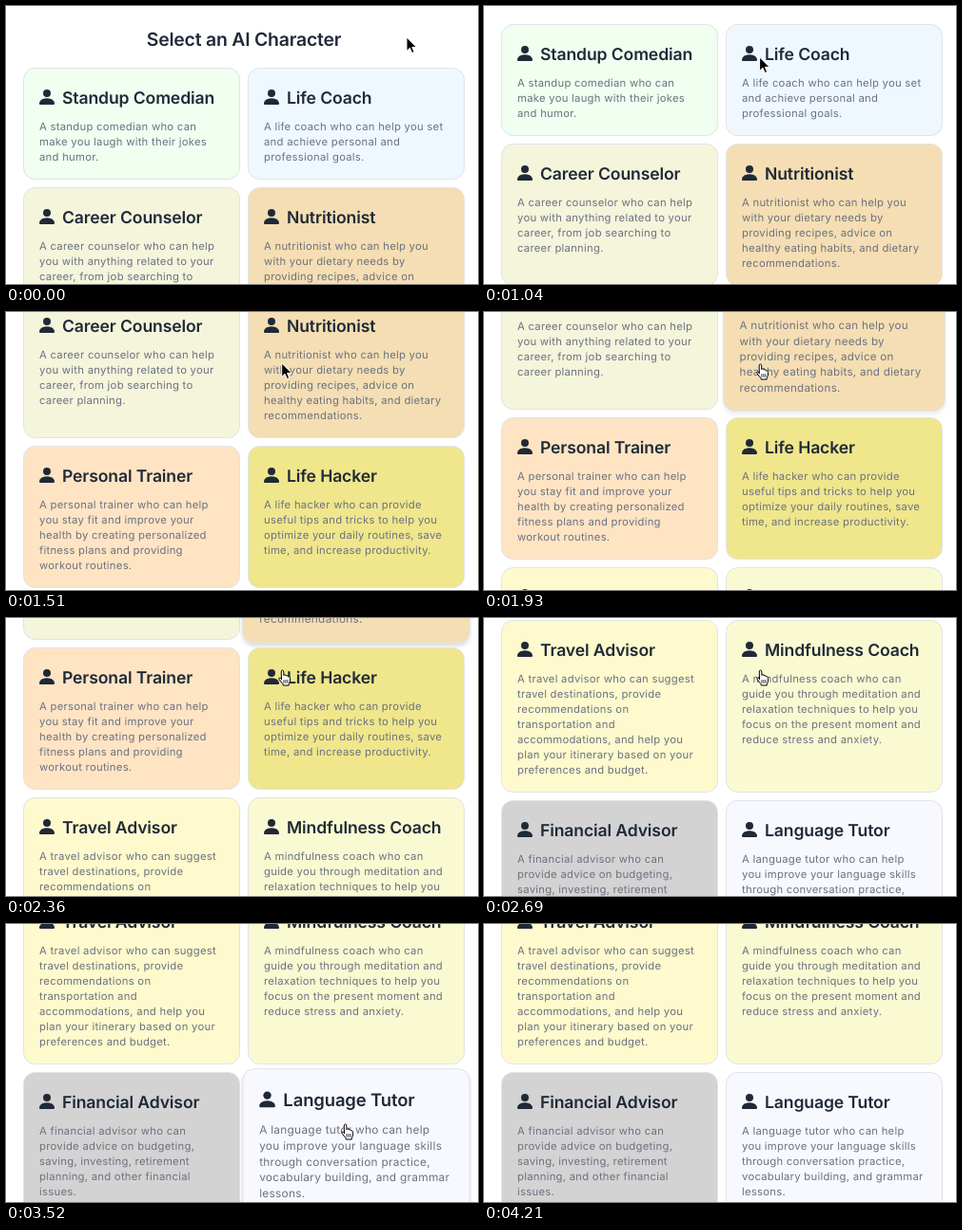
Recreate the animation shown at these times as an HTML page. Size 496 by 293 pixels, loop 4.57 s.

```html
<!DOCTYPE html>
<html lang="en">
<head>
<meta charset="utf-8">
<title>Select an AI Character</title>
<style>
html, body { margin: 0; width: 100%; height: 100%; overflow: hidden; background: #fff; }
svg { display: block; font-family: Inter, "Liberation Sans", sans-serif; text-rendering: geometricPrecision; -webkit-font-smoothing: antialiased; }
.title { font-size: 19.4px; font-weight: 600; letter-spacing: -.2px; fill: #1f2937; text-anchor: middle; }
.name { font-size: 17.6px; font-weight: 600; letter-spacing: -.13px; fill: #1f2937; }
.line { font-size: 11.3px; letter-spacing: .26px; fill: #6b7280; }
.icon { fill: #1f2937; }
</style>
</head>
<body>
<svg id="stage" width="496" height="293" viewBox="0 0 496 293">
  <g id="page"><text class="title" x="250" y="42">Select an AI Character</text></g>
  <path id="arrow" d="M0 0V14.5L3.4 11.3 5.6 16.5 8 15.5 5.8 10.4H10.5Z" fill="#000" stroke="#fff" stroke-linejoin="round"/>
  <g id="hand" stroke="#000" stroke-linecap="round" stroke-linejoin="round">
    <path fill="#fff" d="M-.5 10.5L-.7 3Q-.8 1 .5 1Q1.8 1 1.9 3V6.5Q2.3 5.6 3.3 5.8Q4.2 6 4.3 7Q4.9 6.4 5.7 6.7Q6.5 7 6.5 8Q7.2 7.6 8 8Q8.7 8.4 8.6 9.5V12Q8.4 14 7.3 15.5V17H1.3L1 15.6L-2.8 10.9Q-3.6 9.6-2.6 9Q-1.7 8.6-.5 10.5Z"/>
    <path fill="none" stroke-width=".8" d="M2 11.5V14.3M4 11.5V14.3M6 11.5V14.3"/>
  </g>
</svg>
<script>
(() => {
const LOOP = 4570, FADE = 300, CARD_W = 228, GAP = 8;
const NS = "http://www.w3.org/2000/svg";
const $ = id => document.getElementById(id);

// name, colour, text lines, [enter, leave] of the pointer in ms
const roles = [
  ["Standup Comedian", "#f0fff0", "A standup comedian who can|make you laugh with their jokes|and humor."],
  ["Life Coach", "#f0f8ff", "A life coach who can help you set|and achieve personal and|professional goals."],
  ["Career Counselor", "#f5f5dc", "A career counselor who can help|you with anything related to your|career, from job searching to|career planning."],
  ["Nutritionist", "#f5deb3", "A nutritionist who can help you|with your dietary needs by|providing recipes, advice on|healthy eating habits, and dietary|recommendations.", [1825, 2450]],
  ["Personal Trainer", "#ffe4c4", "A personal trainer who can help|you stay fit and improve your|health by creating personalized|fitness plans and providing|workout routines."],
  ["Life Hacker", "#f0e68c", "A life hacker who can provide|useful tips and tricks to help you|optimize your daily routines, save|time, and increase productivity."],
  ["Travel Advisor", "#fffacd", "A travel advisor who can suggest|travel destinations, provide|recommendations on|transportation and|accommodations, and help you|plan your itinerary based on your|preferences and budget."],
  ["Mindfulness Coach", "#fafad2", "A mindfulness coach who can|guide you through meditation and|relaxation techniques to help you|focus on the present moment and|reduce stress and anxiety.", [2705, 2945]],
  ["Financial Advisor", "#d3d3d3", "A financial advisor who can|provide advice on budgeting,|saving, investing, retirement|planning, and other financial|issues.", [2950, 3150]],
  ["Language Tutor", "#f8f8ff", "A language tutor who can help|you improve your language skills|through conversation practice,|vocabulary building, and grammar|lessons.", [3160, 3895]]
];

function add(parent, tag, attrs, text) {
  const el = document.createElementNS(NS, tag);
  for (const k in attrs) el.setAttribute(k, attrs[k]);
  if (text) el.textContent = text;
  parent.appendChild(el);
  return el;
}

function addCard([name, fill, body, hover], x, y, h) {
  const g = add($("page"), "g", {});
  const rect = add(g, "rect", { x: .5, y: .5, width: CARD_W - 1, height: h - 1, rx: 12, fill, stroke: "#e0e3e8" });
  const icon = add(g, "g", { class: "icon", transform: "translate(14.33 20.33) scale(1.333)" });
  add(icon, "circle", { cx: 8, cy: 5, r: 3 });
  add(icon, "path", { d: "M3 14s-1 0-1-1 1-4 6-4 6 3 6 4-1 1-1 1z" });
  add(g, "text", { class: "name", x: 41, y: 37.5 }, name);
  body.split("|").forEach((s, i) => add(g, "text", { class: "line", x: 17, y: 65.5 + 16 * i }, s));
  return { g, rect, hover, x, y, h };
}

const cards = [];
let rowY = 65;
for (let i = 0; i < roles.length; i += 2) {
  const pair = roles.slice(i, i + 2);
  const h = 70 + 16 * Math.max(...pair.map(r => r[2].split("|").length));
  pair.forEach((r, k) => cards.push(addCard(r, 18 + k * (CARD_W + GAP), rowY, h)));
  rowY += h + GAP;
}

// cubic-bezier(.4, 0, .2, 1)
function ease(x) {
  if (x <= 0) return 0;
  if (x >= 1) return 1;
  let lo = 0, hi = 1, s = .5;
  for (let i = 0; i < 20; i++) {
    s = (lo + hi) / 2;
    const u = 1 - s;
    if (1.2 * s * u * u + .6 * s * s * u + s * s * s < x) lo = s; else hi = s;
  }
  return s * s * (3 - 2 * s);
}

// Smooth curve through points without overshoot
function curve(pts, col) {
  const n = pts.length, T = i => pts[i][0], V = i => pts[i][col];
  const d = i => (V(i + 1) - V(i)) / (T(i + 1) - T(i));
  const m = pts.map((p, i) => {
    if (!i || i === n - 1) return 0;
    const a = d(i - 1), b = d(i);
    return a * b > 0 ? 2 * a * b / (a + b) : 0;
  });
  return t => {
    if (t <= T(0)) return V(0);
    if (t >= T(n - 1)) return V(n - 1);
    let i = 0;
    while (t > T(i + 1)) i++;
    const w = T(i + 1) - T(i), s = (t - T(i)) / w, u = 1 - s;
    return V(i) * (1 + 2 * s) * u * u + V(i + 1) * s * s * (3 - 2 * s)
      + w * s * u * (m[i] * u - m[i + 1] * s);
  };
}

const scrollAt = curve([[860, 0], [1040, 46], [1250, 142], [1510, 208], [1750, 232],
  [2050, 240], [2180, 241], [2360, 318], [2520, 424], [2690, 505], [2850, 535], [3020, 541]], 1);
const route = [[140, 421, 33], [280, 352, 46], [420, 289.5, 54], [2870, 290, 54], [2960, 240, 158],
  [3060, 205, 196], [3155, 254, 212], [3320, 336, 213], [3510, 356, 210]];
const mouseX = curve(route, 1), mouseY = curve(route, 2);

function hoverAt(t, [enter, leave]) {
  const grown = ease((Math.min(t, leave) - enter) / FADE);
  return grown * (1 - ease((t - leave) / FADE));
}

function draw(t) {
  $("page").setAttribute("transform", `translate(0 ${-Math.round(scrollAt(t))})`);
  for (const c of cards) {
    const p = c.hover ? hoverAt(t, c.hover) : 0, k = 1 + .05 * p;
    const x = c.x - CARD_W * (k - 1) / 2, y = c.y - c.h * (k - 1) / 2;
    c.g.setAttribute("transform", `translate(${x} ${y}) scale(${k})`);
    c.rect.style.filter = p ? `drop-shadow(0 3px 2px rgba(0,0,0,${.13 * p}))` : "none";
  }
  const pointing = t >= 1825, at = `translate(${mouseX(t)} ${mouseY(t)})`;
  $("arrow").setAttribute("transform", at);
  $("hand").setAttribute("transform", at);
  $("arrow").style.display = pointing ? "none" : "";
  $("hand").style.display = pointing && t < 3905 ? "" : "none";
}

let start;
function tick(now) {
  if (start === undefined) start = now;
  draw((now - start) % LOOP);
  requestAnimationFrame(tick);
}
draw(0);
requestAnimationFrame(tick);
})();
</script>
</body>
</html>
```
